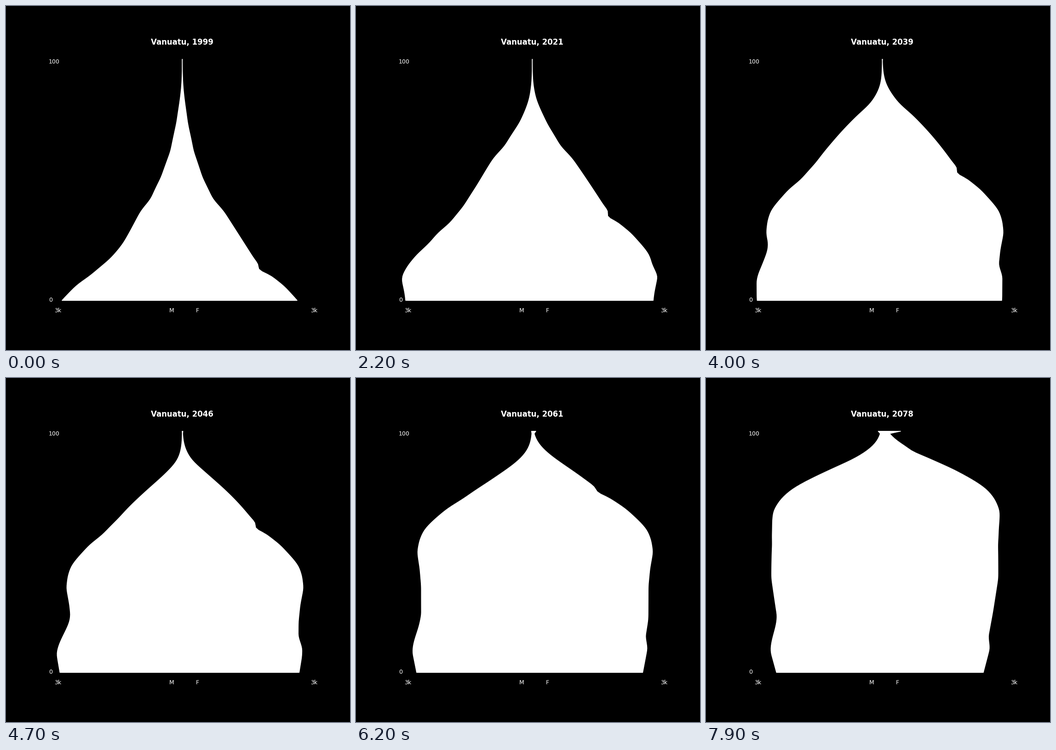
Recreate the animation shown at these times as a matplotlib script. Size 748x748 px, loop 8000 ms.

```python
import numpy as np
import matplotlib.pyplot as plt
from matplotlib.animation import FuncAnimation

SIZE, DPI = 748, 100
START, YEARS = 1999, 80
BASE, TOP, MIDDLE = 640.3, 115.7, 383.4
OLDEST = 115
AGES = np.arange(OLDEST + 1)

plt.rcParams["font.family"] = "DejaVu Sans"

# yearly births of girls, in pixels of half-width
TREND = [(1925, 20), (1937, 28), (1948, 46), (1957, 69), (1962, 93),
         (1982, 162), (1989, 194), (1993, 221), (1999, 250), (2002, 262),
         (2006, 269), (2011, 272), (2018, 264.5), (2025, 260.5), (2039, 260),
         (2053, 248), (2069, 232), (2085, 210)]
COHORTS = np.arange(START - OLDEST, START + YEARS)


def smooth(x, lo, hi):
    u = np.clip((x - lo) / (hi - lo), 0, 1)
    return u * u * (3 - 2 * u)


def yearly_births():
    span = np.arange(COHORTS[0] - 2, COHORTS[-1] + 3)
    soft = np.array([1, 2, 3, 2, 1]) / 9
    return np.convolve(np.interp(span, *zip(*TREND)), soft, "valid")


BIRTHS = yearly_births()


def survival(age, born, peak, gain):
    """Share still alive; the usual age at death rises with each cohort."""
    typical = np.maximum(79, peak + gain * (born - 1986))
    risk = np.exp((age - typical) / 9)
    return np.exp(-risk / (1 + 0.075 * risk))


def women(age, born):
    dip = 1 - 0.06 * np.exp(-((born - 1986.3) / 1.8) ** 2)
    stay = 1 - 0.032 * smooth(age, 9, 16)
    return dip * stay * survival(age, born, 91.7, 0.22)


def men(age, born):
    leaving = 0.115 * smooth(born, 1945, 1975)
    stay = 1 - leaving * smooth(age, 7, 25)
    return 1.048 * stay * survival(age, born, 86.5, 0.19)


def widths(year, group):
    """Half-widths for ages 0 to 99, then everyone of 100 and over."""
    born = year - AGES
    people = BIRTHS[born - COHORTS[0]] * group(AGES, born)
    return np.append(people[:100], people[100:].sum())


fig = plt.figure(figsize=(SIZE / DPI, SIZE / DPI), dpi=DPI, facecolor="black")
ax = fig.add_axes([0, 0, 1, 1])
ax.set(xlim=(0, SIZE), ylim=(SIZE, 0))
ax.axis("off")

heights = np.linspace(BASE, TOP, 101)
body, = ax.fill([0, 1, 1], [0, 0, 1], fc="white", ec="white", lw=1,
                joinstyle="round")


def label(x, y, text, ha="center", **style):
    return ax.text(x, y, text, color="white", ha=ha, va="baseline", **style)


title = label(383.3, 84, "", size=12, weight="bold")
label(93, 125, "100", "left", size=9)
label(93, 643, "0", "left", size=9)
for x, text in ((112.8, "3k"), (359.8, "M"), (416.2, "F"), (669.2, "3k")):
    label(x, 666, text, size=9)


def draw(i):
    year = START + i
    left = MIDDLE - widths(year, men)
    right = MIDDLE + widths(year, women)
    body.set_xy(np.column_stack([np.r_[left, right[::-1]],
                                 np.r_[heights, heights[::-1]]]))
    title.set_text(f"Vanuatu, {year}")
    return body, title


anim = FuncAnimation(fig, draw, frames=YEARS, interval=100,
                     repeat=True, repeat_delay=0)
plt.show()
```
